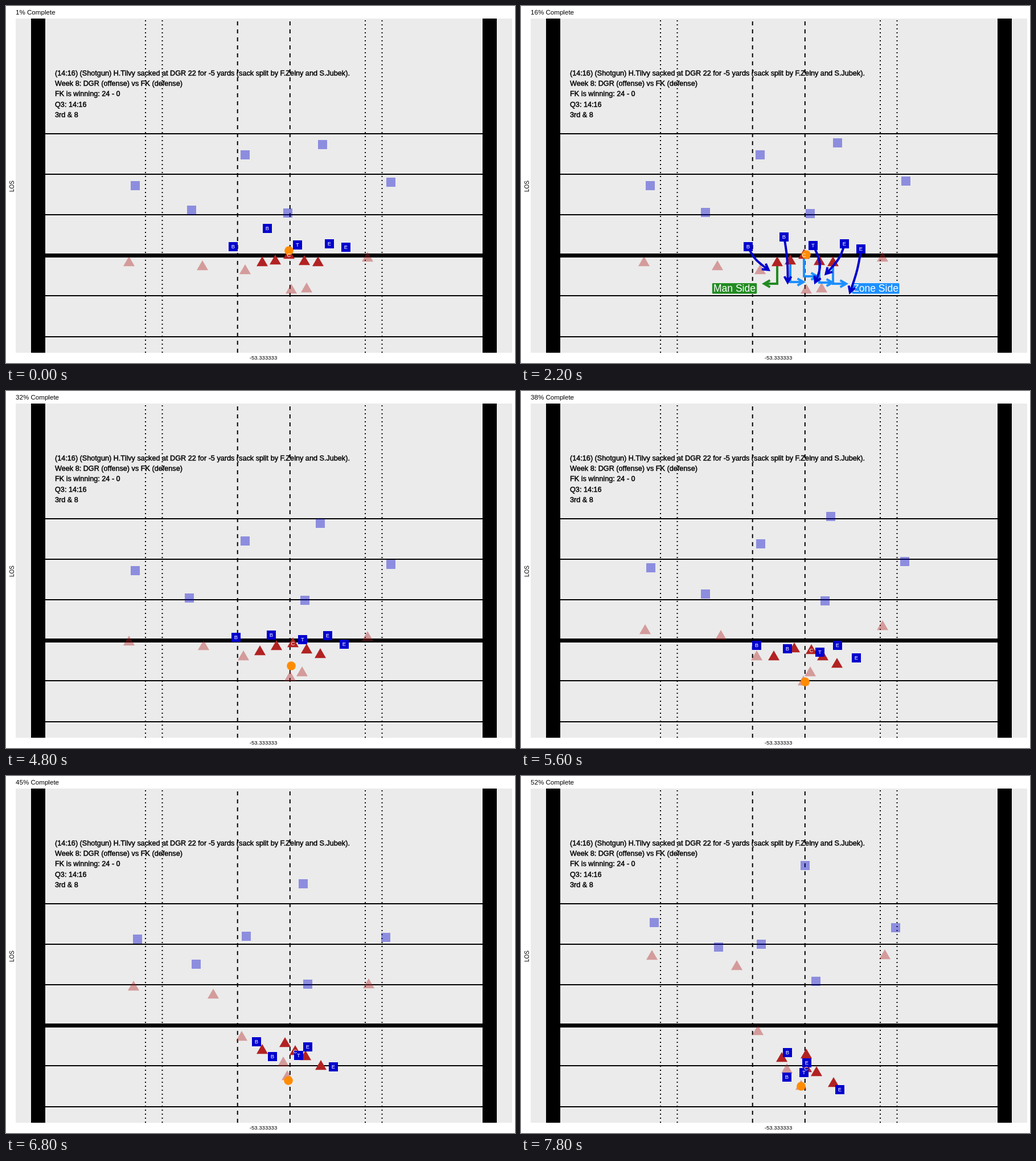
Recreate the animation shown at these times as an HTML page. Size 894 px wide and 626 px high, loop 8000 ms.

```html
<!DOCTYPE html>
<html lang="en">
<head>
<meta charset="utf-8">
<title>Pass rush</title>
<style>
  html, body { margin: 0; width: 100%; height: 100%; overflow: hidden; background: #fff; }
  svg { display: block; width: 894px; height: 626px; }
  text { font-family: "Liberation Sans", Arial, sans-serif; }
  .note { font-size: 12.67px; stroke: #000; stroke-width: .45px; }
  .tag { font-size: 9.5px; fill: #fff; text-anchor: middle; }
  .side { font-size: 17.5px; fill: #fff; text-anchor: middle; }
  .arrow { fill: none; stroke-width: 4; }
</style>
</head>
<body>
<svg id="stage" viewBox="0 0 894 626" xmlns="http://www.w3.org/2000/svg"></svg>
<script>
const STEP = 200, LOOP = 8000, TOTAL = 77;
const SNAP = 5, MID = 14, END = 25;  // play steps of the key points
const HOLD = 14;                     // the play freezes this many steps at the snap
const BLUE = '#0000cd', RED = '#b22222', GREEN = '#228b22', SKY = '#1e90ff';

const stage = document.getElementById('stage');

function add(tag, attrs, parent = stage, text) {
  const el = document.createElementNS('http://www.w3.org/2000/svg', tag);
  for (const k in attrs) el.setAttribute(k, attrs[k]);
  if (text) el.textContent = text;
  parent.appendChild(el);
  return el;
}
const rect = (x, y, width, height, fill) => add('rect', { x, y, width, height, fill });
const line = (d, width, dash = 'none') =>
  add('path', { d, stroke: '#000', 'stroke-width': width, 'stroke-dasharray': dash });

// Cubic from a to b over h steps with end speeds va, vb
function hermite(a, va, b, vb, h, u) {
  const w = 1 - u;
  return w * w * ((1 + 2 * u) * a + u * h * va) + u * u * ((3 - 2 * u) * b - w * h * vb);
}

// Steady drift up to the snap, then a smooth run through mid to end
function glide(start, snap, mid, end, kick, p) {
  const drift = (snap - start) / SNAP;
  if (p < SNAP) return start + drift * p;
  const h1 = MID - SNAP, h2 = END - MID;
  const s1 = (mid - snap) / h1, s2 = (end - mid) / h2;
  const turn = (s1 * h2 + s2 * h1) / (h1 + h2);
  return p < MID
    ? hermite(snap, drift + kick, mid, turn, h1, (p - SNAP) / h1)
    : hermite(mid, turn, end, 1.5 * s2 - .5 * turn, h2, (p - MID) / h2);
}
const track = (snap, mid, end, start = snap, kick = 0) => p =>
  [0, 1].map(i => glide(start[i], snap[i], mid[i], end[i], i * kick, p));

// Field
rect(17, 22, 872, 586, '#ebebeb');
for (const x of [245, 274.5, 631, 660.5]) line(`M${x} 608V22`, 2, '2 5');
for (const x of [406.7, 498.8]) line(`M${x} 608V22`, 2, '7 7');
for (const k of [-3, -2, -1, 1, 2]) line(`M69 ${Math.round(437.2 + 71.2 * k)}H837`, 2);
line('M69 437.5H837', 7);
rect(44, 22, 25, 586, '#000');
rect(837, 22, 25, 586, '#000');

// Text
const title = add('text', { x: 17, y: 15, 'font-size': 11.6 });
add('text', { x: 452, y: 620, 'font-size': 9.6, 'text-anchor': 'middle' }, stage, '-53.333333');
add('text', { transform: 'translate(13.5 316) rotate(-90)', 'font-size': 10, 'text-anchor': 'middle' }, stage, 'LOS');
[
  '(14:16) (Shotgun) H.Tilvy sacked at DGR 22 for -5 yards (sack split by F.Zelny and S.Jubek).',
  'Week 8: DGR (offense) vs FK (defense)',
  'FK is winning: 24 - 0',
  'Q3: 14:16',
  '3rd & 8'
].forEach((s, i) => add('text', { class: 'note', x: 86, y: 121.8 + i * 18.25 }, stage, s));

// Layers, bottom to top
const [backs, schemes, linemen, rushes, front, tags] =
  Array.from({ length: 6 }, () => add('g', {}));

const square = opacity => ['rect', { x: -8, y: -8, width: 16, height: 16, fill: BLUE, opacity }];
const triangle = opacity => ['path', { d: 'M0 -9L10 8.3H-10Z', fill: RED, opacity }];
const disc = ['circle', { r: 7.8, fill: '#ff8c00' }];

const movers = [];
function mover(layer, [shape, attrs], at, tag, tagY = 3.4) {
  const els = [add(shape, attrs, layer)];
  if (tag) els.push(add('text', { class: 'tag', y: tagY }, tags, tag));
  movers.push({ els, at });
  return at;
}
const cover = (...pts) => mover(backs, square(.4), track(...pts));
const route = (...pts) => mover(backs, triangle(.4), track(...pts));
const block = (tag, ...pts) => mover(linemen, triangle(1), track(...pts), tag, 5.4);
const rush = (tag, ...pts) => mover(front, square(1), track(...pts), tag);

// Each player: place at the snap, mid play, end, and the start if it differs
cover([227, 315], [228, 310], [234, 257]);
cover([324, 362], [324, 356], [347, 300], [326, 358]);
cover([420, 261], [421, 268], [422, 295]);
cover([556, 240], [544, 220], [499, 157], [556, 243]);
cover([508, 364], [534, 368], [518, 360], [495, 363]);
cover([676, 307], [674, 299], [658, 266], [676, 309]);

route([216, 448], [218, 418], [230, 314]);
route([345, 455], [351, 428], [379, 332]);
route([420, 462], [414, 464], [416, 446]);
route([635, 440], [635, 411], [639, 313]);
route([501, 496], [496, 508], [492, 542]);
route([528, 494], [508, 492], [467, 513]);

const blockers = [
  block('', [450, 448], [444, 464], [458, 493]),
  block('', [473, 445], [480, 450], [501, 487]),
  block('C', [497, 435], [510, 453], [501, 511]),
  block('', [524, 446], [530, 464], [519, 518]),
  block('', [548, 448], [555, 477], [549, 537])
];
const rushers = [
  rush('B', [399, 422], [414, 446], [468, 485]),
  rush('B', [462, 405], [468, 452], [467, 528], [459, 390]),
  rush('T', [513, 420], [525, 458], [497, 520], [512, 419]),
  rush('E', [568, 417], [556, 446], [502, 503]),
  rush('E', [597, 426], [589, 468], [560, 550], [597, 423])
];
mover(front, disc, track([501, 436], [499, 510], [492, 544], [497, 429], 9));

// Arrows and labels shown during the freeze
function arrow(points, color, layer) {
  const [[px, py], [x, y]] = points.slice(-2);
  const dir = Math.atan2(y - py, x - px);
  const barb = s => `${x - 12 * Math.cos(dir + s)} ${y - 12 * Math.sin(dir + s)}`;
  add('path', {
    class: 'arrow', stroke: color,
    d: `M${points.join('L')}M${barb(.52)}L${x} ${y}L${barb(-.52)}`
  }, layer);
}
function sideLabel(x, width, text, fill) {
  add('rect', { x: x - width / 2, y: 485.5, width, height: 19.5, rx: 2, fill, stroke: '#fff', 'stroke-width': .8 }, schemes);
  add('text', { class: 'side', x, y: 501.3 }, schemes, text);
}

blockers.forEach((at, i) => {
  const [x, y] = at(SNAP), low = y + 39;
  arrow([[x, y], [x, low], [x + (i ? 23 : -23), low]], i ? SKY : GREEN, schemes);
});
sideLabel(375, 79.5, 'Man Side', GREEN);
sideLabel(623, 84, 'Zone Side', SKY);
for (const at of rushers)
  arrow(Array.from({ length: 15 }, (_, i) => at(SNAP + i)), BLUE, rushes);

function draw(ms) {
  const n = Math.floor((ms % LOOP) / STEP);
  const p = n < SNAP ? n : Math.max(SNAP, n - HOLD);
  title.textContent = `${Math.round((n + 1) / TOTAL * 100)}% Complete`;
  for (const { els, at } of movers) {
    const place = `translate(${at(p).map(Math.round)})`;
    for (const el of els) el.setAttribute('transform', place);
  }
  const shown = p === SNAP ? 'visible' : 'hidden';
  for (const layer of [schemes, rushes]) layer.setAttribute('visibility', shown);
}

let start;
function tick(now) {
  start ??= now;
  draw(now - start);
  requestAnimationFrame(tick);
}
draw(0);
requestAnimationFrame(tick);
</script>
</body>
</html>
```
